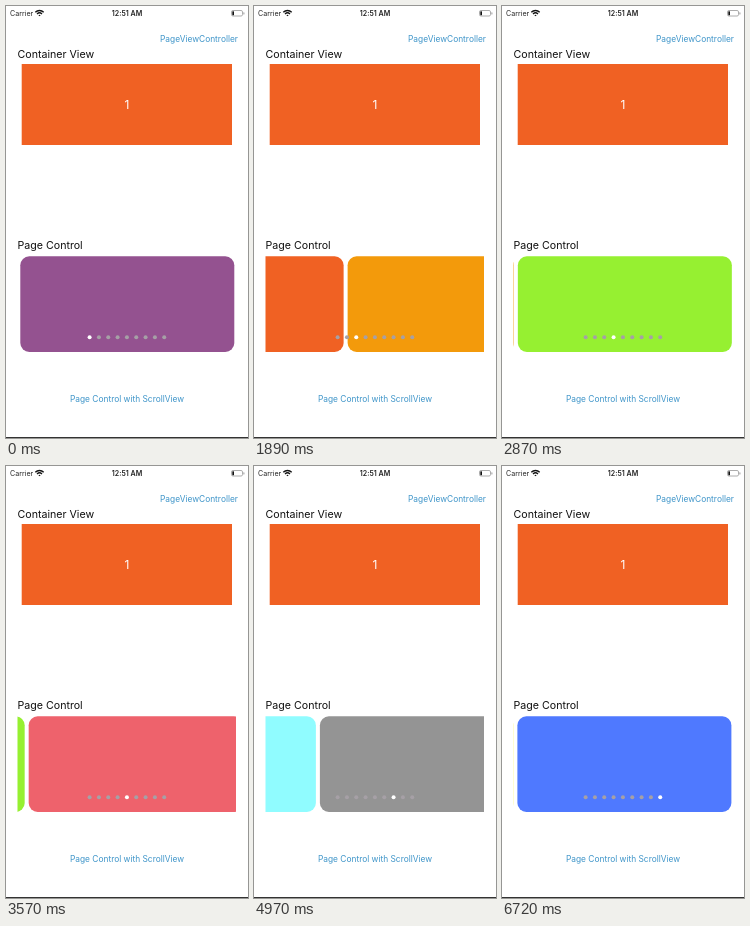
An HTML page for the animation above (6790 ms loop, 242 by 432 pixels).

```html
<!DOCTYPE html>
<html lang="en">
<head>
<meta charset="utf-8">
<title>Page Control</title>
<style>
  html, body { margin: 0; width: 100%; height: 100%; overflow: hidden; background: #fff; }
  svg { display: block; width: 242px; height: 432px; font-family: Inter, "Liberation Sans", sans-serif; }
  .title { font-size: 10.65px; fill: #111; }
  .link { font-size: 8.4px; fill: #3f95c9; }
  .status { font-size: 7.1px; fill: #222; }
</style>
</head>
<body>
<svg viewBox="0 0 242 432">
  <clipPath id="view"><rect x="11.5" y="249" width="218.5" height="98"/></clipPath>

  <text class="status" x="4" y="9.6">Carrier</text>
  <g fill="none" stroke="#111" stroke-width="1.3">
    <path d="M29.3 6.2a6 6 0 0 1 8.4 0M31 8a3.6 3.6 0 0 1 5 0"/>
    <path d="M33.5 10.3l-1.1-1.1a1.6 1.6 0 0 1 2.2 0z" fill="#111" stroke="none"/>
  </g>
  <text class="status" x="121" y="9.7" text-anchor="middle" font-weight="600">12:51 AM</text>
  <rect x="225.5" y="4.5" width="11" height="5.5" rx="1.4" fill="none" stroke="#999" stroke-width=".8"/>
  <rect x="226.3" y="5.3" width="1.7" height="3.9" rx=".5" fill="#111"/>
  <rect x="237.4" y="6.2" width="1" height="2.2" rx=".5" fill="#999"/>

  <text class="link" x="232" y="36.3" text-anchor="end">PageViewController</text>
  <text class="title" x="11.5" y="51.6">Container View</text>
  <rect x="15.7" y="58" width="210.3" height="81" fill="#f06123"/>
  <text x="121" y="102.8" text-anchor="middle" font-size="12" fill="#fff">1</text>

  <text class="title" x="11.5" y="242.8">Page Control</text>
  <g clip-path="url(#view)"><g id="pages"></g></g>
  <g id="dots"></g>
  <text class="link" x="121" y="396.3" text-anchor="middle">Page Control with ScrollView</text>
  <rect y="431" width="242" height="1" fill="#333"/>
</svg>
<script>
const LOOP = 6790, STEP = 218;
const colors = ['#945290', '#f06123', '#f39a0b', '#96f031', '#ee626c',
                '#90fcff', '#949494', '#fff31a', '#4f79ff'];
// each swipe: start time and time constant, ms
const swipes = [[770, 210], [1680, 210], [2450, 210], [3220, 210],
                [3990, 218], [4760, 180], [5530, 194], [6370, 170]];
const pages = document.getElementById('pages');
const dots = document.getElementById('dots');

function add(parent, tag, attrs) {
  const el = document.createElementNS('http://www.w3.org/2000/svg', tag);
  for (const k in attrs) el.setAttribute(k, attrs[k]);
  parent.append(el);
}

colors.forEach((fill, i) => {
  add(pages, 'rect', { x: 14.3 + i * STEP, y: 250.3, width: 214, height: 95.7, rx: 9, fill });
  add(dots, 'circle', { cx: 83.6 + i * 9.33, cy: 331.3, r: 2 });
});

// quick drag that settles smoothly
function swipe(t, tau) {
  return t <= 0 ? 0 : t > 560 ? 1 : 1 - Math.exp(-((t / tau) ** 2.3));
}

function draw(now) {
  const t = now % LOOP;
  const pos = swipes.reduce((sum, [start, tau]) => sum + swipe(t - start, tau), 0);
  const current = Math.round(pos);
  pages.setAttribute('transform', `translate(${-pos * STEP} 0)`);
  [...dots.children].forEach((dot, i) =>
    dot.setAttribute('fill', i === current ? '#fff' : '#a6a0a6'));
}

const origin = performance.now();
function tick() {
  draw(performance.now() - origin);
  requestAnimationFrame(tick);
}
tick();
</script>
</body>
</html>
```
